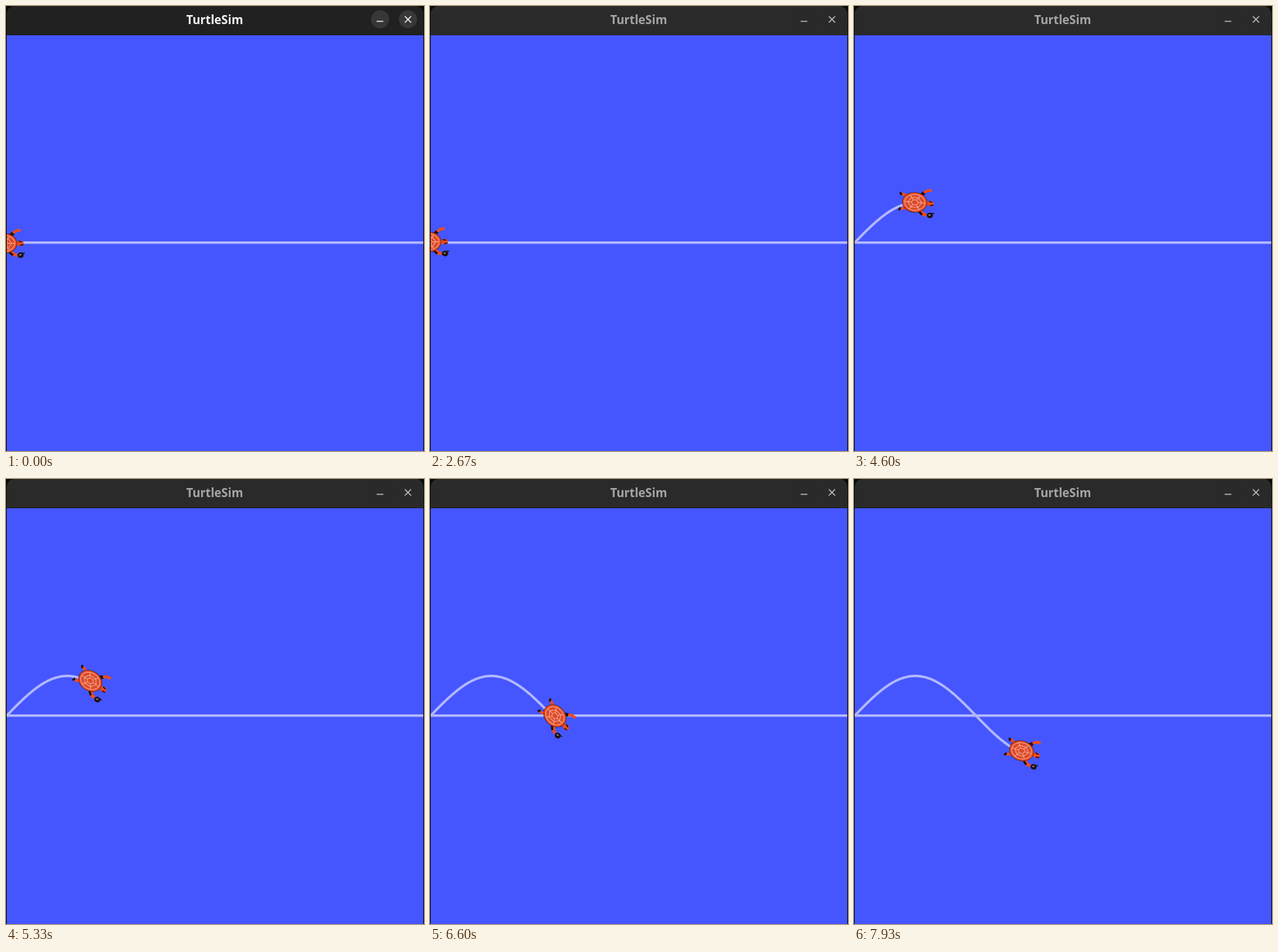
An HTML page with a canvas for the animation above (8000 ms loop, 600 by 639 pixels).

```html
<!DOCTYPE html>
<html>
<head>
<meta charset="utf-8">
<title>TurtleSim</title>
<style>
  html, body { margin: 0; width: 100%; height: 100%; overflow: hidden; background: #000; }
  canvas { display: block; }
</style>
</head>
<body>
<canvas id="stage" width="600" height="639"></canvas>
<script>
const ctx = document.getElementById('stage').getContext('2d');
const LOOP = 8000, STEP = 1000 / 15;
const START = 2660, SPEED = 0.046, TURN = 300;
const BASE = 339.8, AMP = 57, HALF = 174;
const PEN = '#b3b8ff', RED = '#ea4a20', DARK = '#21100f', PALE = '#f5a994';

const phase = x => Math.PI * Math.max(0, x - 1) / HALF;
const wave = x => BASE - AMP * Math.sin(phase(x));
const slope = x => -AMP * Math.PI / HALF * Math.cos(phase(x));

// The turtle waits at the left edge, turns onto the sine wave, then follows it.
function poseAt(t) {
  const run = t - START;
  if (run < 0) return { x: -2, y: BASE + 1, angle: 0 };
  const x = SPEED * run - 2;
  const turn = Math.min(1, run / TURN);
  return { x, y: wave(x - 3) - 1, angle: turn * Math.atan(slope(x + 5)) };
}

function line(color, width, ...pts) {
  ctx.strokeStyle = color;
  ctx.lineWidth = width;
  ctx.beginPath();
  for (let i = 0; i < pts.length; i += 2) ctx.lineTo(pts[i], pts[i + 1]);
  ctx.stroke();
}

function oval(color, x, y, rx, ry = rx) {
  ctx.fillStyle = color;
  ctx.beginPath();
  ctx.ellipse(x, y, rx, ry, 0, 0, 2 * Math.PI);
  ctx.fill();
}

function shell() {
  oval(DARK, 0, 0, 18, 14.5);
  oval(RED, 0, 0, 17.5, 14);
  oval(PALE, 0, 0, 15, 12);
  oval('#dc4a2a', 0, 0, 14, 11);
  const point = (r, i) => [r * Math.cos(i * Math.PI / 3), 0.8 * r * Math.sin(i * Math.PI / 3)];
  for (let i = 0; i < 6; i++) {
    line(PALE, 1, ...point(5, i), ...point(14, i));
    for (const r of [5, 10]) line(PALE, 1, ...point(r, i), ...point(r, i + 1));
  }
}

function turtle({ x, y, angle }) {
  ctx.save();
  ctx.translate(x, y);
  ctx.rotate(angle);
  // hind legs
  for (const side of [-1, 1]) {
    line(RED, 4, -13, 9 * side, -20, 11 * side);
    line(DARK, 3, -20, 9 * side, -22, 13 * side);
  }
  // left arm
  line(DARK, 5, 8, -11, 13, -15);
  line(RED, 4, 12, -15, 17, -18, 23, -19);
  // right arm and hand
  line(RED, 5, 8, 11, 13, 16, 18, 17);
  line(DARK, 3, 7, 13, 12, 17);
  oval(DARK, 23, 17, 4.5, 4);
  line('#8d9aa5', 1.5, 21, 17, 24, 16);
  line(DARK, 1.5, 25, 14, 29, 14);
  // head
  line(RED, 6, 14, 0, 21, 0);
  oval(RED, 23, 0, 4.5, 4);
  line(DARK, 1.5, 20, -3, 25, -2);
  line(DARK, 1.5, 22, 3, 27, 2);
  shell();
  ctx.restore();
}

// blur runs from 0 (focused window) to 1 (unfocused)
function titleBar(blur) {
  const grey = (a, b) => {
    const v = Math.round(a + (b - a) * blur);
    return `rgb(${v},${v},${v})`;
  };
  ctx.fillStyle = '#050a03';
  ctx.fillRect(0, 0, 600, 42);
  ctx.fillStyle = grey(33, 42);
  ctx.beginPath();
  ctx.roundRect(1, 0, 598, 41, [11, 11, 0, 0]);
  ctx.fill();
  ctx.fillStyle = grey(24, 30);
  ctx.fillRect(1, 41, 598, 1);

  ctx.fillStyle = grey(242, 166);
  ctx.font = 'bold 17px "Noto Sans", "Open Sans", sans-serif';
  ctx.textAlign = 'center';
  ctx.fillText('TurtleSim', 299.5, 26);

  for (const x of [537, 577]) oval(grey(55, 42), x, 19, 13);
  const icon = grey(242, 190);
  line(icon, 1.4, 532, 22, 541.5, 22);
  line(icon, 1.5, 572.5, 14.8, 581.5, 23.8);
  line(icon, 1.5, 581.5, 14.8, 572.5, 23.8);
}

function draw(t) {
  const pose = poseAt(t);
  ctx.fillStyle = '#4556ff';
  ctx.fillRect(0, 0, 600, 639);

  line(PEN, 3.5, 0, BASE, 600, BASE);
  const trail = [];
  for (let x = 1; x < pose.x; x++) trail.push(x, wave(x));
  line(PEN, 3.5, ...trail);
  turtle(pose);

  titleBar(t < 264 ? 0 : t < 330 ? 0.5 : 1);
  ctx.fillStyle = '#080808';
  for (const x of [0, 599]) ctx.fillRect(x, 42, 1, 597);
}

function frame() {
  const t = performance.now() % LOOP;
  draw(Math.floor((t + 4) / STEP) * STEP);
  requestAnimationFrame(frame);
}
frame();
</script>
</body>
</html>
```
